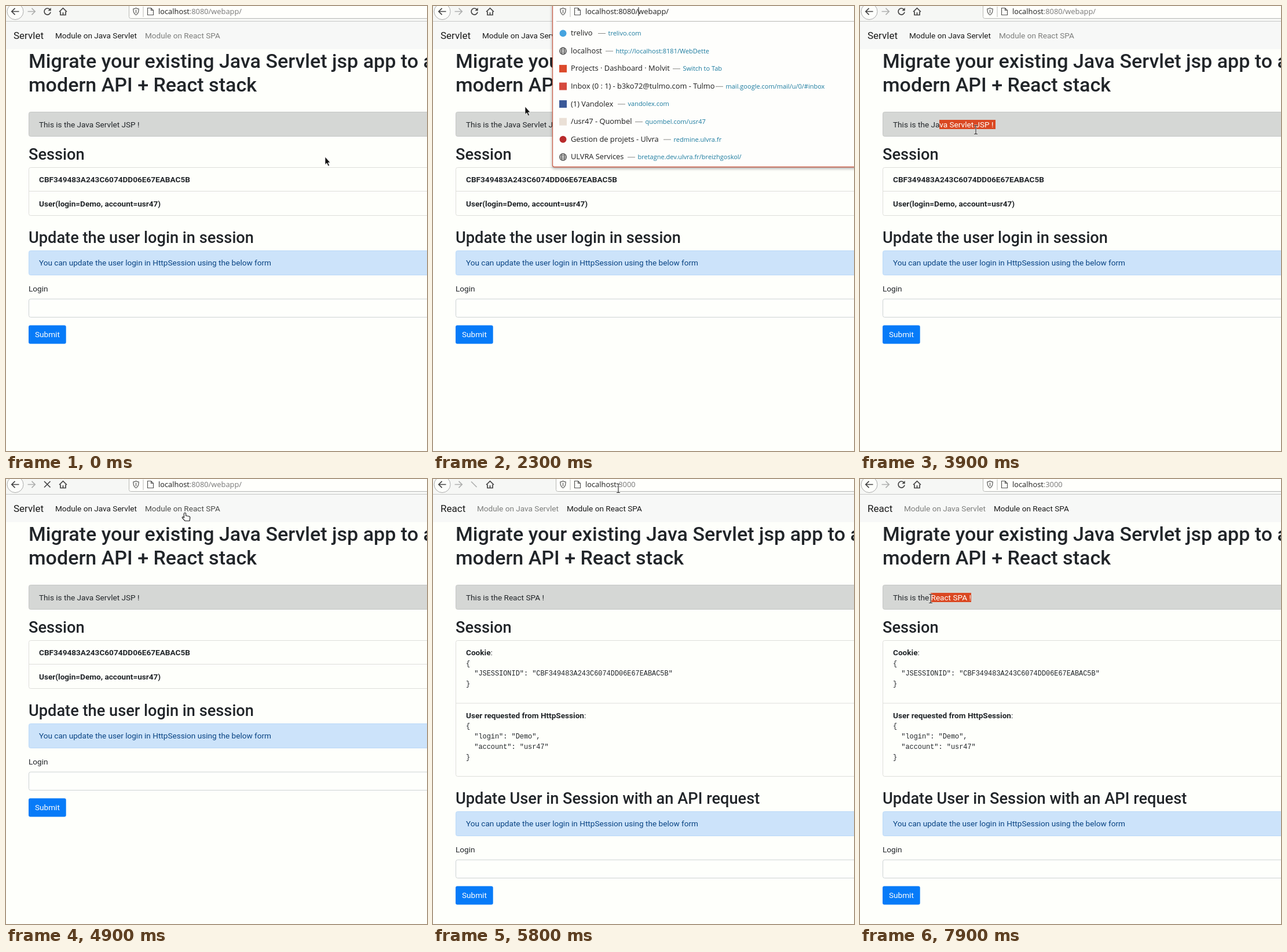
Recreate the animation shown at these times as an HTML page. Size 727 by 770 pixels, loop 8000 ms.

```html
<!DOCTYPE html>
<html lang="en">
<head>
<meta charset="utf-8">
<title>Servlet to React</title>
<style>
html, body { margin: 0; width: 100%; height: 100%; overflow: hidden; background: #fefffb; }
svg { display: block; width: 100%; height: 100%; }
text { font-family: Roboto, sans-serif; font-size: 13.6px; fill: #212529; white-space: pre; }
.h1 { font-size: 34px; font-weight: 500; }
.h2 { font-size: 27.2px; font-weight: 500; }
.brand { font-size: 17px; fill: #191919; }
.bold { font-weight: 700; }
.active { fill: #191919; }
.muted { fill: #7d7e7c; }
.muted.hover { fill: #4c4d4b; }
.info { fill: #084383; }
.white { fill: #fffffb; }
.mono { font-family: "Liberation Mono", monospace; font-size: 11.9px; }
.ui { font-family: "Open Sans", "Noto Sans", sans-serif; font-size: 12.85px; fill: #1c1c1c; }
.link { font-size: 11px; fill: #1b7b9f; }
.dim { fill: #777; }
.icon { fill: none; stroke: #454545; stroke-width: 1.7; }
.thin { fill: none; stroke: #555; stroke-width: 1.2; }
</style>
</head>
<body>
<svg id="stage" viewBox="0 0 727 770" preserveAspectRatio="none"></svg>
<script>
const LOOP = 8000, EDGE = 760;
const text = (x, y, str, cls = '') => `<text x="${x}" y="${y}" class="${cls}">${str}</text>`;
const box = (x, y, w, h, fill, stroke = 'none', r = 3) =>
  `<rect x="${x}" y="${y}" width="${w}" height="${h}" rx="${r}" fill="${fill}" stroke="${stroke}"/>`;
const path = (d, cls = 'icon', extra = '') => `<path d="${d}" class="${cls}" ${extra}/>`;
const group = (id, body, extra = '') => `<g id="${id}" ${extra}>${body}</g>`;

const NOTE = { servlet: 'This is the Java Servlet JSP !', react: 'This is the React SPA !' };
const PORT = { servlet: ':8080/webapp/', react: ':3000' };

// Page parts
const wide = (y, h, fill, stroke) => box(39.5, y, EDGE, h, fill, stroke);
const pageTop = (brand, first, second, name) =>
  `<rect y="27" width="727" height="47.5" fill="#f7f8f7"/>` +
  text(13, 57, brand, 'brand') + first + second +
  text(39, 107, 'Migrate your existing Java Servlet jsp app to a', 'h1') +
  text(39, 148, 'modern API + React stack', 'h1') +
  wide(183.5, 42, '#d5d7d5', '#c4c6c5') + text(57, 210, NOTE[name]) +
  text(39, 265.5, 'Session', 'h2');

const form = (title, dy) => `<g transform="translate(0 ${dy})">` +
  text(39, 410, title, 'h2') +
  wide(423.5, 42, '#cce3fa', '#b9d8f8') +
  text(57, 449, 'You can update the user login in HttpSession using the below form', 'info') +
  text(39, 494, 'Login') +
  wide(507, 31.5, '#fefffc', '#cdd2d5') +
  box(39, 552.5, 64.7, 32, '#077bf8') + text(50, 573, 'Submit', 'white') + '</g>';

const list = (mid, bottom) => wide(279.5, bottom - 279.5, 'none', '#dededb') +
  path(`M39.5 ${mid}H${EDGE}`, '', 'stroke="#dededb"');
const pre = (top, lines) => lines.map((s, i) => text(57, top + i * 17.85, s, 'mono')).join('');

const servletPage = pageTop('Servlet',
    text(85, 56, 'Module on Java Servlet', 'active'),
    text(240, 56, 'Module on React SPA', 'muted" id="reactLink'), 'servlet') +
  list(320.5, 362.5) +
  text(57, 305, 'CBF349483A243C6074DD06E67EABAC5B', 'bold') +
  text(57, 346.5, 'User(login=Demo, account=usr47)', 'bold') +
  form('Update the user login in session', 0);

const reactPage = pageTop('React',
    text(76, 56, 'Module on Java Servlet', 'muted'),
    text(231, 56, 'Module on React SPA', 'active'), 'react') +
  list(388, 514.5) +
  text(57, 305, '<tspan class="bold">Cookie</tspan>:') +
  pre(322.5, ['{', '  "JSESSIONID": "CBF349483A243C6074DD06E67EABAC5B"', '}']) +
  text(57, 414, '<tspan class="bold">User requested from HttpSession</tspan>:') +
  pre(431.3, ['{', '  "login": "Demo",', '  "account": "usr47"', '}']) +
  form('Update User in Session with an API request', 152);

// Browser parts
const toolbar =
  `<rect width="727" height="26" fill="#f6f7f5"/>` +
  path('M0 26.5H727', '', 'stroke="#c8c9c7"') +
  `<circle cx="16" cy="9.5" r="14" fill="#fdfefb" stroke="#aaa"/>` +
  path('M22.5 9.5H10M15.5 3.8L9.8 9.5l5.7 5.7') +
  path('M37.5 9.5H50M44.5 3.8l5.7 5.7-5.7 5.7', 'icon', 'opacity=".4"') +
  path('M92 10l6.5-6.3L105 10M94 9.5V15.500H103V9.500M98.500 15.500V11') +
  group('reload', path('M76 6.2A5.500 5.500 0 1 0 77 10.500') + path('M77.700 3V8.300H72.400z', '', 'fill="#454545"')) +
  group('stop', path('M66 4L76.500 14.500M76.500 4L66 14.500')) +
  group('half', path('M66 4.500L75.500 14', 'icon', 'opacity=".4"')) +
  box(212.5, -6, EDGE, 27.5, '#fffffc', '#b6b7b4');

const globe = y => `<g transform="translate(224.5 ${y})" class="thin"><circle r="6"/>` +
  `<ellipse rx="2.800" ry="6"/><path d="M-6 0H6M-5 -3H5M-5 3H5"/></g>`;
const disc = fill => y => `<circle cx="224.500" cy="${y}" r="6" fill="${fill}"/>`;
const tile = fill => y => box(218, y - 6.5, 13, 13, fill, 'none', 0);

// icon, title, dash position, address
const ROWS = [
  [disc('#45a3df'), 'trelivo', 284, 'trelivo.com'],
  [globe, 'localhost', 297, 'http://localhost:8181/WebDette'],
  [tile('#dc4a2b'), 'Projects · Dashboard · Molvit', 413, 'Switch to Tab'],
  [tile('#d5493d'), 'Inbox (0 : 1) - b3ko72@tulmo.com - Tulmo', 487, 'mail.google.com/mail/u/0/#inbox'],
  [tile('#3b5998'), '(1) Vandolex', 318, 'vandolex.com'],
  [tile('#eae0d6'), '/usr47 - Quombel', 348, 'quombel.com/usr47'],
  [disc('#b82a2b'), 'Gestion de projets - Ulvra', 397, 'redmine.ulvra.fr'],
  [globe, 'ULVRA Services', 335, 'bretagne.dev.ulvra.fr/breizhgoskol/'],
];
const rowY = i => 46.7 + i * 30.6;
const popup = `<rect x="206.500" y="-12" width="${EDGE}" height="290.500" rx="3" fill="#fefefc" stroke="#c8604c" stroke-width="1.300" filter="url(#shadow)"/>` +
  path(`M213 26.500H${EDGE}`, '', 'stroke="#b8b8b5"') +
  `<rect id="hoverRow" x="213" width="${EDGE}" height="27" fill="#ebebe9"/>` +
  ROWS.map(([icon, title, dash, address], i) => {
    const y = rowY(i);
    return icon(y + .5) + text(238, y + 4.5, title, 'ui') +
      path(`M${dash + 1} ${y + .8}h13`, '', 'stroke="#8a8a88"') +
      text(dash + 18.5, y + 4.3, address, 'ui link');
  }).join('');

const urlIcons =
  path('M224.500 3.500C222.500 4.800 221 5 219.800 5C219.800 10 220.500 13.500 224.500 15.500C228.500 13.500 229.200 10 229.200 5C228 5 226.500 4.800 224.500 3.500zM224.500 6.500V12.500', 'thin', 'stroke-width="1.500"') +
  path('M237 1V19', '', 'stroke="#bbbbb9"') +
  path('M244.500 3.500H250.500L254.500 7.500V15.500H244.500zM250.500 3.500V7.500H254.500', 'thin');

const selection = (id, x, y, top, cls) =>
  `<clipPath id="${id}Clip"><rect y="${top}" height="16"/></clipPath>` +
  group(id, `<rect y="${top}" height="16" fill="#da4822"/>` +
    `<text x="${x}" y="${y}" class="${cls}" style="fill:#fffffb" clip-path="url(#${id}Clip)"></text>`);

const beam = 'M-3 -7.500H-1Q0 -7.500 0 -6.500Q0 -7.500 1 -7.500H3M0 -6.500V6.500M-3 7.500H-1Q0 7.500 0 6.500Q0 7.500 1 7.500H3';
const cursors =
  group('arrow', path('M0 0V13.500L3 10.800 5.300 16 7.500 15 5.200 10H9z', '', 'fill="#111" stroke="#fff" stroke-width=".700"')) +
  group('beam', path(beam, '', 'fill="none" stroke="#fff" stroke-width="2.400" opacity=".7"') +
    path(beam, '', 'fill="none" stroke="#222" stroke-width="1.100"')) +
  group('hand', path('M0 .5C1.200 .5 1.600 1.200 1.600 2V5.500L7 6.500Q9 7 8.800 9L8 14.500H0L-4.500 9.500C-5.200 8 -3.800 7 -2.600 8L-1.600 8.800V2C-1.600 1.200 -1.200 .5 0 .5z', '', 'fill="#fff" stroke="#222" stroke-width="1.200"'));

document.getElementById('stage').innerHTML =
  `<defs><filter id="shadow" x="-5%" y="-10%" width="110%" height="125%"><feDropShadow dx="0" dy="2" stdDeviation="2.500" flood-opacity=".35"/></filter></defs>` +
  `<rect width="727" height="770" fill="#fefffb"/>` +
  group('servlet', servletPage) + group('react', reactPage) + selection('noteSel', 57, 210, 197, '') +
  toolbar + group('popup', popup) + urlIcons +
  `<text id="url" x="263" y="14" class="ui">localhost<tspan></tspan></text>` +
  selection('urlSel', 263, 14, 1.5, 'ui') +
  `<path id="caret" d="M0 2V17" stroke="#111"/>` + group('cursor', cursors);

// Step tables: each entry holds from its time until the next one
const PAGE = [[0, 'servlet'], [5000, 'blank'], [5600, 'react']];
const LOADER = [[0, 'reload'], [4700, 'stop'], [5700, 'half'], [6000, 'reload']];
const POPUP = [[0, false], [1300, true], [2500, false], [6100, true], [7100, false]];
const HOVER_ROW = [[0, -1], [2000, 0], [2100, 1], [2200, -1], [6800, 0], [6900, 1], [7000, 5], [7100, -1]];
const LINK_HOVER = [[0, false], [2900, true], [3500, false], [4500, true], [5000, false]];
const CARET = [[0, 0], [1700, 355], [2500, 0], [6500, 350.5], [7100, 0]];
const URL_SEL = [[0], [1300, 263, 407], [1700], [6100, 263, 350], [6300, 320, 350], [6500]];
const NOTE_SEL = [[0], [3900, 137, 234], [4000, 110, 234], [4100, 77, 234], [4600], [7800, 150, 192], [7900, 122, 192]];
const CURSOR = [
  [0, 'arrow', 551, 261], [100, 'arrow', 549, 262], [500, 'arrow', 550, 260],
  [900, 'arrow', 520, 190], [1000, 'arrow', 455, 60], [1100, 'beam', 423, 13],
  [1600, 'beam', 385, 12], [1700, 'beam', 356, 12], [1900, 'arrow', 345, 20],
  [2000, 'arrow', 310, 45], [2100, 'arrow', 250, 95], [2200, 'arrow', 195, 145],
  [2300, 'arrow', 159, 174], [2500, 'arrow', 154, 140], [2600, 'arrow', 159, 89],
  [2800, 'arrow', 190, 75], [2900, 'hand', 245, 56], [3000, 'hand', 290, 52],
  [3500, 'arrow', 270, 110], [3600, 'arrow', 245, 180], [3700, 'beam', 234, 224],
  [3900, 'beam', 200, 214], [4000, 'beam', 120, 208], [4100, 'beam', 77, 207],
  [4200, 'arrow', 150, 150], [4300, 'arrow', 284, 67], [4500, 'hand', 305, 56],
  [4600, 'hand', 309, 58], [5400, 'hand', 309, 57], [5600, 'arrow', 314, 45],
  [5700, 'arrow', 318, 28], [5800, 'beam', 320, 16], [6000, 'beam', 335, 10],
  [6700, 'beam', 360, 12], [6800, 'arrow', 374, 14], [6900, 'arrow', 350, 70],
  [7000, 'arrow', 290, 200], [7100, 'arrow', 234, 325], [7300, 'arrow', 225, 270],
  [7400, 'beam', 200, 215], [7500, 'beam', 190, 207], [7800, 'beam', 150, 207],
  [7900, 'beam', 122, 207],
];

const el = id => document.getElementById(id);
const at = (table, t) => table.findLast(step => step[0] <= t).slice(1);
const show = (id, on) => { el(id).style.display = on ? '' : 'none'; };
const showOne = (ids, chosen) => ids.forEach(id => show(id, id === chosen));

function select(id, [from, to], str) {
  show(id, from !== undefined);
  if (from === undefined) return;
  for (const rect of [el(id).querySelector('rect'), el(id + 'Clip').firstChild]) {
    rect.setAttribute('x', from);
    rect.setAttribute('width', to - from);
  }
  el(id).querySelector('text').textContent = str;
}

function render(t) {
  const [page] = at(PAGE, t), [open] = at(POPUP, t), [row] = at(HOVER_ROW, t);
  const [caret] = at(CARET, t), [shape, x, y] = at(CURSOR, t);
  const port = PORT[page] || PORT.react;

  showOne(['servlet', 'react'], page);
  showOne(['reload', 'stop', 'half'], at(LOADER, t)[0]);
  el('reactLink').classList.toggle('hover', at(LINK_HOVER, t)[0]);

  show('popup', open);
  show('hoverRow', row >= 0);
  el('hoverRow').setAttribute('y', rowY(row) - 13.5);
  const tail = el('url').lastChild;
  tail.textContent = port;
  tail.setAttribute('class', open ? '' : 'dim');
  show('caret', caret > 0);
  el('caret').setAttribute('transform', `translate(${caret} 0)`);

  select('urlSel', at(URL_SEL, t), 'localhost' + port);
  select('noteSel', at(NOTE_SEL, t), NOTE[page]);

  showOne(['arrow', 'beam', 'hand'], shape);
  el('cursor').setAttribute('transform', `translate(${x} ${y})`);
}

const start = performance.now();
function tick() {
  render((performance.now() - start) % LOOP);
  requestAnimationFrame(tick);
}
tick();
</script>
</body>
</html>
```
